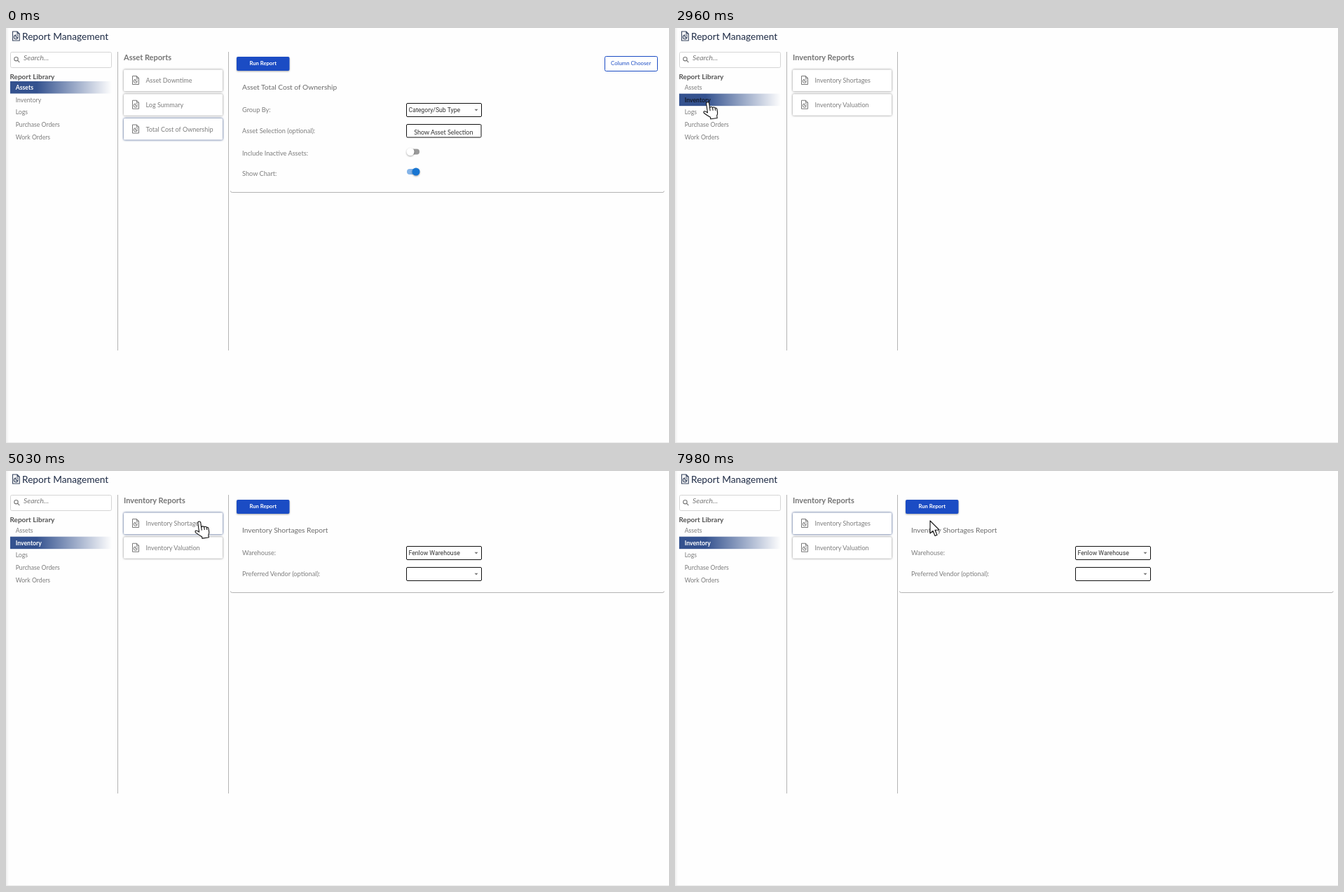
These frames come from a looping animation (946x592 px, 8000 ms). An HTML page:

```html
<!DOCTYPE html>
<html lang="en">
<head>
<meta charset="utf-8">
<title>Report Management</title>
<style>
  html, body { margin: 0; width: 100%; height: 100%; overflow: hidden; background: #fefefe; }
  svg { display: block; width: 946px; height: 592px; font-family: Lato, sans-serif; }
  .card { fill: #fff; filter: drop-shadow(0 .7px 1.4px rgba(0,0,0,.5)); }
  .card.on { filter: drop-shadow(0 .8px 1.4px rgba(25,55,115,1)); }
  .field { fill: #fff; stroke: #111; }
  .select { font-family: Roboto, sans-serif; }
  .raised { filter: drop-shadow(0 1px 1px rgba(0,0,0,.35)); }
  #click { fill: #fff23c; opacity: .85; mix-blend-mode: multiply; }
  .cursor { fill: #fff; stroke: #111; stroke-width: 1.1; stroke-linejoin: round; }
</style>
</head>
<body>
<svg id="stage" viewBox="0 0 946 592"></svg>
<script>
const LOOP = 8000, STEP = 78, CLICK_TIME = 130;
const OPEN_INVENTORY = 1750, OPEN_SHORTAGES = 4950;
const GREY = '#7d7d7d', BLUE = '#1b4cc4';

// Pointer moves: start, end, then where the tip comes to rest.
const ENTRY = [885, 564];
const MOVES = [
  [70, 480, 31, 84],
  [680, 960, 36, 108],
  [1150, 1220, 34, 104],
  [2960, 3320, 256, 114],
  [3550, 4030, 224, 71],
  [4420, 4650, 278, 71],
  [5500, 6270, 690, 140],
  [6350, 6580, 585, 178],
  [6580, 6740, 696, 119],
  [6740, 6970, 672, 108],
  [7110, 7740, 318, 30],
  [7740, 7980, 364, 71]
];

const MENU = ['Assets', 'Inventory', 'Logs', 'Purchase Orders', 'Work Orders'];
const menuY = i => 88 + 17.65 * i;

const text = (x, y, label, size = 9, fill = GREY, extra = '') =>
  `<text x="${x}" y="${y}" font-size="${size}" fill="${fill}" ${extra}>${label}</text>`;
const bold = 'font-weight="700"', centered = 'text-anchor="middle"';
const rect = (x, y, w, h, extra = '') =>
  `<rect x="${x}" y="${y}" width="${w}" height="${h}" ${extra}/>`;
const group = (id, content) => `<g id="${id}">${content}</g>`;
const icon = (x, y, color, scale = 1) =>
  `<g transform="translate(${x} ${y}) scale(${scale})" fill="none" stroke="${color}">
    <path d="M.5 .5H6.5L9.5 3.5V12.5H.5ZM6.5 .5V3.5H9.5"/>
    <path d="M4.7 5.2A2.6 2.6 0 1 0 7.4 8H4.7ZM6 4.8A2.3 2.3 0 0 1 7.8 6.6"/></g>`;

const card = (label, i) => {
  const y = 59.5 + 34.75 * i;
  return rect(168, y, 141, 30.5, 'rx="1.5" class="card"') +
    icon(180, y + 8.5, '#777') + text(199.5, y + 18.5, label, 9.05);
};
const reportList = (title, names) =>
  text(168, 45.5, title, 11, '#757575', bold) + names.map(card).join('');
const panel = (bottom, title) =>
  `<path d="M320.5 ${bottom - 2}q0 2 2 2H937q2 0 2-2" fill="none" stroke="#b4b4b4"/>` +
  rect(329, 41, 75.5, 20, `rx="2" fill="${BLUE}" class="raised"`) +
  text(366.7, 53.4, 'Run Report', 7.7, '#fff', `${bold} ${centered}`) +
  text(337, 87.5, title, 10.2, '#6c6c6c');
const label = (y, words) => text(337, y, words, 9.2);
const select = (y, value = '') =>
  rect(571.5, y, 107, 19, 'rx="1.5" class="field"') +
  text(574.5, y + 12.7, value, 8.7, '#333', 'class="select"') +
  `<path d="M668.5 ${y + 8.3}h5l-2.5 2.7z" fill="#777"/>`;
const toggle = (y, track, knob, x) =>
  rect(572, y - 4, 18, 8, `rx="4" fill="${track}"`) +
  `<circle cx="${x}" cy="${y}" r="5.5" fill="${knob}" class="raised"/>`;

const frame = `
  <defs>
    <linearGradient id="fade"><stop offset=".26" stop-color="#34528f"/><stop offset="1" stop-color="#34528f" stop-opacity="0"/></linearGradient>
    <linearGradient id="edge"><stop stop-color="#eee"/><stop offset="1" stop-color="#fefefe"/></linearGradient>
  </defs>
  ${rect(0, 0, 946, 592, 'fill="#fefefe"')}
  ${rect(0, 0, 4, 592, 'fill="url(#edge)"')}
  ${rect(0, 591, 946, 1, 'fill="#eaeaea"')}
  ${icon(9, 4.5, '#34425c', 1.08)}
  ${text(23, 16.5, 'Report Management', 13.7, '#1e2b45')}
  ${rect(6.5, 34.5, 144, 22, 'rx="2" fill="#fff" stroke="#d5d5d5"')}
  <g fill="none" stroke="#777" stroke-width="1.1"><circle cx="14.5" cy="44.2" r="2.7"/><path d="M16.5 46.2l2.8 2.8"/></g>
  ${text(25, 46, 'Search...', 10.3, '#777', 'font-style="italic"')}
  ${text(5.5, 73, 'Report Library', 10, '#555', bold)}
  ${rect(6, 0, 145, 17.5, 'id="selection" fill="url(#fade)"')}
  ${MENU.map((name, i) => text(13.7, menuY(i), name, 8.7, GREY, `id="menu${i}"`)).join('')}
  <path d="M159.5 34V460M317.5 34V460" stroke="#b4b4b4"/>`;

const assets =
  reportList('Asset Reports', ['Asset Downtime', 'Log Summary', 'Total Cost of Ownership']) +
  panel(234.5, 'Asset Total Cost of Ownership') +
  rect(854.5, 40.5, 75, 21, `rx="2" fill="#fff" stroke="${BLUE}"`) +
  text(891.7, 53.4, 'Column Chooser', 7.8, BLUE, centered) +
  label(120, 'Group By:') + select(107.5, 'Category/Sub Type') +
  label(149.7, 'Asset Selection (optional):') +
  rect(571.5, 137.5, 106.5, 18.5, 'rx="1.5" class="field"') +
  text(624.3, 152, 'Show Asset Selection', 9, '#333', centered) +
  label(182, 'Include Inactive Assets:') + toggle(176.5, '#999', '#fff', 577) +
  label(211, 'Show Chart:') + toggle(205, '#84b4e8', '#1976d2', 585);

const inventory = reportList('Inventory Reports', ['Inventory Shortages', 'Inventory Valuation']);

const shortages = panel(173.5, 'Inventory Shortages Report') +
  label(120, 'Warehouse:') + select(107.5, 'Fenlow Warehouse') +
  label(149.7, 'Preferred Vendor (optional):') + select(137.5);

const pointer = `
  <circle id="click" cx="1.5" cy="1" r="15"/>
  <path id="arrow" class="cursor" d="M0 0V18L4 14.3 7 21.5 10 20.3 7 13.3 13 13Z"/>
  <path id="hand" class="cursor" transform="translate(-2.5 1) rotate(-8)" d="M-2 2Q-2 0 0 0T2 2V9Q2 7.5 4 7.5 5.5 7.5 6 9 6.5 8 8 8.5 9.5 9 9.5 10 10.5 9.5 11.5 10.5 12 11 12 13V17Q12 19 10.5 21V24.5H1V22Q-3 19-7 15-8 13-6.5 12.3-5 12-2 15ZM2 9V13M6 9V13M9.5 10V13.5"/>`;

document.getElementById('stage').innerHTML = frame + group('assets', assets) +
  group('inventory', inventory) + group('shortages', shortages) + group('pointer', pointer);

const el = id => document.getElementById(id);
const show = (id, on) => { el(id).style.display = on ? '' : 'none'; };
const inside = ([x, y], left, top, right, bottom) => x >= left && x <= right && y >= top && y <= bottom;
const ease = u => (1 - Math.cos(Math.PI * u)) / 2;
const shortageCard = document.querySelector('#inventory .card');
document.querySelectorAll('#assets .card')[2].classList.add('on');

// Each move advances in even steps; its first step shows at once.
function tipAt(t) {
  const i = MOVES.findLastIndex(move => move[0] <= t);
  const [start, end, x1, y1] = MOVES[i];
  const [x0, y0] = i ? MOVES[i - 1].slice(2) : ENTRY;
  const steps = Math.round((end - start) / STEP);
  const done = Math.min(steps, Math.floor((t - start) / (end - start) * steps + 0.05));
  const u = ease((done + 1) / (steps + 1));
  return [x0 + (x1 - x0) * u, y0 + (y1 - y0) * u];
}

function draw(t) {
  const inInventory = t >= OPEN_INVENTORY, inShortages = t >= OPEN_SHORTAGES;
  const selected = inInventory ? 1 : 0;
  const visible = t >= MOVES[0][0];
  const tip = visible ? tipAt(t) : [-50, -50];

  show('assets', !inInventory);
  show('inventory', inInventory);
  show('shortages', inShortages);
  shortageCard.classList.toggle('on', inShortages);
  el('selection').setAttribute('y', menuY(selected) - 12);

  let onItem = false;
  MENU.forEach((name, i) => {
    const over = inside(tip, 6, menuY(i) - 12, 150, menuY(i) + 5);
    const item = el('menu' + i);
    onItem = onItem || over;
    item.setAttribute('fill', over ? '#151b2b' : i === selected ? '#fff' : GREY);
    item.setAttribute('font-weight', i === selected ? 700 : 400);
  });

  const onCard = inside(tip, 168, 59, 309, 126);
  const onRun = inShortages && inside(tip, 329, 41, 404, 61);
  const isHand = onItem || onCard || onRun;
  show('pointer', visible);
  show('hand', isHand);
  show('arrow', !isHand);
  show('click', [OPEN_INVENTORY, OPEN_SHORTAGES].some(open => t < open && t >= open - CLICK_TIME));
  el('pointer').setAttribute('transform', `translate(${tip.map(v => v.toFixed(1)).join(' ')})`);
}

const begin = performance.now();
function tick() {
  draw((performance.now() - begin) % LOOP);
  requestAnimationFrame(tick);
}
tick();
</script>
</body>
</html>
```
